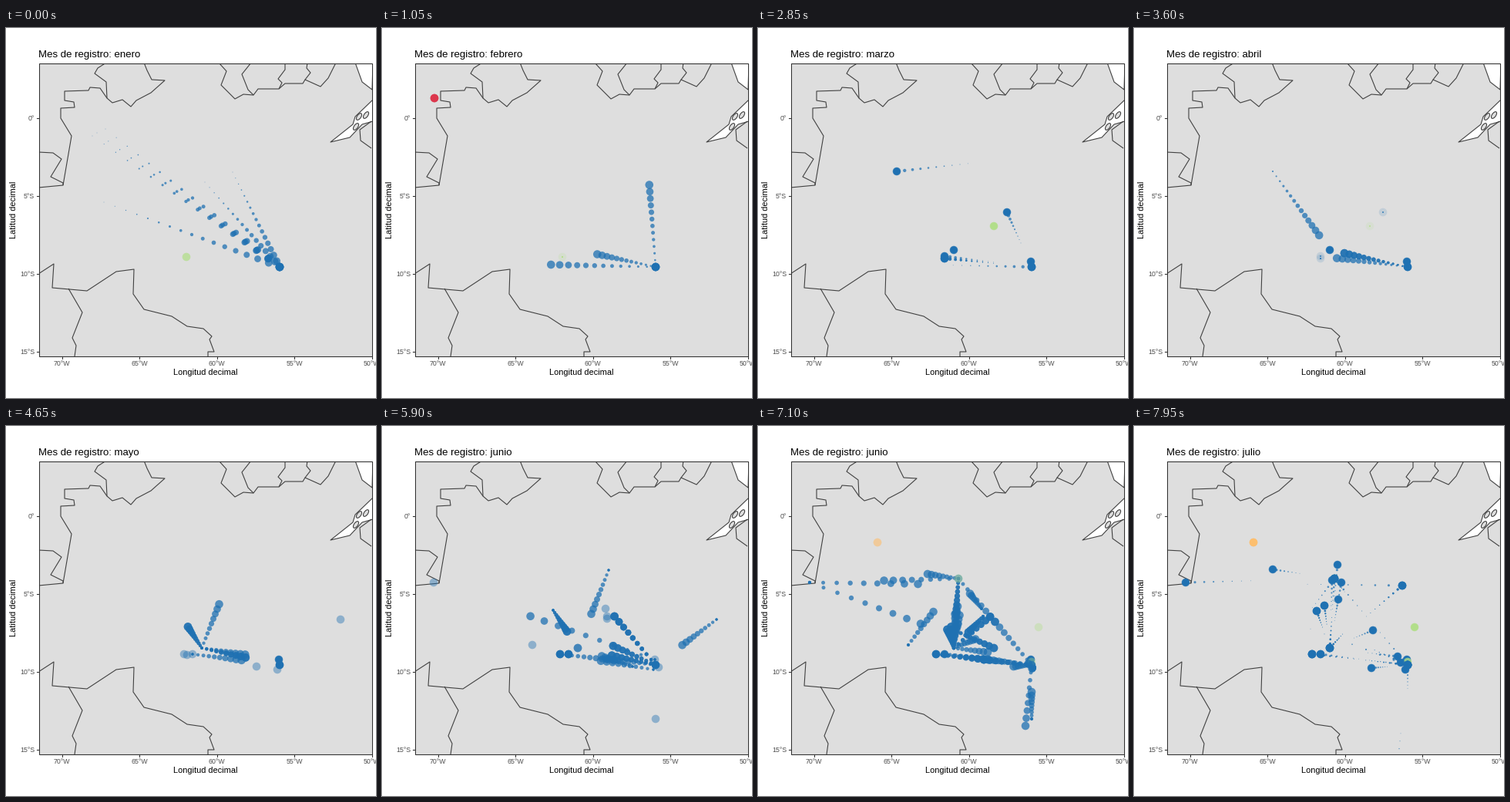
Animation, 480 px wide and 480 px high, one loop 8000 ms. Source, as a matplotlib script:

```python
import numpy as np
import matplotlib.pyplot as plt
from matplotlib.animation import FuncAnimation
from matplotlib.colors import to_rgb
from matplotlib.patches import Ellipse, Polygon, Rectangle

SIZE, DPI = 480, 80
PT = 72 / DPI                      # points per pixel
FRAMES, STEP = 160, 50
CYCLE, MOVE, WAKE, LEAD = 25, 16, 17, 16
RADIUS, ALPHA = 5.3, 0.75
LEFT, RIGHT, TOP, BOTTOM = 42.5, 474.5, 45.5, 425.5
LAND, LINE, DARK = "#dedede", "#404040", "#333333"
BLUE, GREEN, RED, ORANGE = "#1f71b2", "#b2df8a", "#dc2840", "#fdbf6f"
MONTHS = "enero febrero marzo abril mayo junio julio".split()

plt.rcParams["font.family"] = "Liberation Sans"
fig = plt.figure(figsize=(SIZE / DPI, SIZE / DPI), dpi=DPI, facecolor="white")
ax = fig.add_axes([0, 0, 1, 1])
ax.set_xlim(0, SIZE)
ax.set_ylim(SIZE, 0)
ax.axis("off")


def panel(**kw):
    box = Rectangle((LEFT, TOP), RIGHT - LEFT, BOTTOM - TOP, **kw)
    return ax.add_patch(box)


def label(x, y, text, px, color="black", **kw):
    return ax.text(x, y, text, fontsize=px * PT, color=color, **kw)


# ---- map -------------------------------------------------------------
clip = panel(fc=LAND, ec="none", zorder=0)
PEN = dict(ec=LINE, lw=1.1 * PT, zorder=1)


def outline(*flat, closed=False, fill="none"):
    xy = np.reshape(flat, (-1, 2))
    patch = Polygon(xy, closed=closed, fc=fill, joinstyle="round", **PEN)
    ax.add_patch(patch).set_clip_path(clip)


def water(*flat):
    outline(*flat, closed=True, fill="white")


water(453, 45, 462, 70, 475, 80, 476, 45)
water(476, 93, 453, 115, 450, 125, 421, 148, 446, 142, 462, 125, 476, 121)
for x, y in (458, 115), (467, 113), (454, 128):
    ax.add_patch(Ellipse((x, y), 5, 10, angle=35, fc=LAND, **PEN))

# north-west
outline(130, 45, 119, 52, 115, 59, 130, 70, 131, 91, 138, 97, 151, 93,
        162, 102, 169, 94, 188, 84, 206, 68, 189, 67, 183, 55, 179, 45)
outline(131, 91, 122, 78, 109, 77, 107, 81, 76, 82, 76, 94, 88, 96, 89, 103,
        71, 104, 71, 117, 85, 140, 74, 204)
outline(42, 161, 61, 162, 72, 170, 58, 193, 74, 201, 74, 204, 42, 207)
# north
outline(276, 45, 286, 56, 279, 74, 297, 92, 308, 86, 321, 87, 327, 79,
        354, 79, 362, 72, 385, 72, 388, 67, 408, 76, 418, 65, 428, 45)
outline(318, 45, 306, 60, 314, 80, 321, 87)
outline(362, 45, 362, 54, 353, 66, 358, 71, 354, 79)
outline(391, 45, 390, 52, 395, 58, 388, 67)
# south-west
outline(42, 319, 62, 306, 60, 337, 105, 341, 143, 316, 166, 313, 165, 345,
        179, 365, 215, 374, 235, 387, 256, 390, 267, 400, 264, 404, 270, 420,
        262, 420, 262, 426)
outline(81, 338, 99, 369, 86, 402, 91, 412, 89, 426)
# river mouth
outline(474, 121, 459, 132, 460, 146, 474, 156)

# ---- frame, ticks and labels -----------------------------------------
panel(fc="none", ec=DARK, lw=1.07 * PT, zorder=5)
for i in range(5):
    x = 72.5 + 100.5 * i
    ax.plot([x, x], [BOTTOM, BOTTOM + 3], color=DARK, lw=1.07 * PT)
    label(x, 438, f"{70 - 5 * i}°W", 8.8, "#4d4d4d", ha="center")
for i in range(4):
    y = 116.5 + 101 * i
    ax.plot([LEFT - 3, LEFT], [y, y], color=DARK, lw=1.07 * PT)
    label(37, y + 3.2, f"{5 * i}°S" if i else "0°", 8.8, "#4d4d4d", ha="right")
label(258.5, 450, "Longitud decimal", 11, ha="center")
label(10, 236, "Latitud decimal", 11, ha="center", va="center", rotation=90)
title = label(42, 38, "", 13.2)

# ---- records: (from, to, copies, colour); None means fade in or out ----
# Places visited more than once
B, H, W, V, N = (355, 310), (254, 288), (242, 296), (231, 296), (260, 198)
E, T, M = (354, 303), (67, 203), (257, 266)
NORTH, WEST, FAR = (344, 168), (174, 306), (180, 186)
UP, LOW, TALL = (323, 239), (242, 299), (294, 187)
MID, EAST, NEAR, SIDE = (222, 239), (434, 251), (325, 312), (352, 316)
LONE, DEEP, R1, R2 = (195, 284), (355, 380), (290, 237), (292, 247)
G1, G2, RUBY = (234, 297), (306, 257), (68, 91)


def go(p, q, n=1, color=BLUE):
    return [(p, q, n, color)]


def stay(*places, n=1):
    return [(p, p, n, BLUE) for p in places]


def enter(*places, n=1, color=BLUE):
    return [(None, p, n, color) for p in places]


def leave(*places, n=1, color=BLUE):
    return [(p, None, n, color) for p in places]


def fan(p, *places, n=1):
    return [(p, q, n, BLUE) for q in places]


def meet(q, *places, n=1):
    return [(p, q, n, BLUE) for p in places]


january = enter(G1, color=GREEN) + meet(
    B, (112, 140), (118, 136), (129, 131), (127, 226), (258, 200), TALL)

february = (leave(G1, color=GREEN) + enter(RUBY, n=3, color=RED)
            + fan(B, NORTH, WEST, H) + stay(B, n=4))

march = (leave(RUBY, n=3, color=RED) + enter(G2, color=GREEN)
         + go(NORTH, FAR) + go(WEST, B) + fan(B, W, UP, E)
         + go(B, LOW, 2) + stay(H, B, B))

april = (leave(G2, color=GREEN) + leave(UP, W, LOW) + go(FAR, H)
         + fan(B, H, H, W) + stay(H, E, B, B))

may = (enter(EAST, NEAR, SIDE, V, (235, 297), W) + fan(H, MID, MID, TALL)
       + meet(B, H, H, W) + go(H, E) + stay(E, B, B))

june = (enter(T, LONE, DEEP, R1, R2, (292, 250), (359, 313), E) + enter(H, n=3)
        + go(EAST, B) + meet(H, TALL, MID, MID) + go(E, T) + go(B, N, 3)
        + fan(B, M, H, n=2) + go(B, W) + go(V, B) + go(NEAR, H) + go(SIDE, V)
        + stay(V, W, B, n=2))

july = (stay(E) + enter((355, 306), (364, 261), color=GREEN)
        + enter((155, 151), n=2, color=ORANGE) + enter(N, n=2, color=GREEN)
        + enter(N) + go(T, (348, 207)) + meet(B, T, DEEP, N)
        + meet(N, LONE, B, H, R1) + fan(N, FAR, T, H, H)
        + fan(B, (339, 468), (308, 314), (346, 307))
        + fan(H, (257, 200), (265, 225), (264, 180), (269, 203), (310, 265),
              (342, 299))
        + fan(H, (237, 240), (247, 233), (348, 207), n=2)
        + go(R2, H, 2) + go(M, B, 2) + go((359, 313), SIDE)
        + go(V, B, 2) + go(B, V, 2) + go(W, B) + go(B, W)
        + stay(V, V, W, B))

STAGES = [january, february, march, april, may, june, july]


def locate(frame):
    """Stage number and step within it."""
    pos = frame + LEAD
    stage = min(pos // CYCLE, len(STAGES) - 1)
    return stage, pos - stage * CYCLE


def dots(frame, age):
    stage, step = locate(frame)
    t = min(step / MOVE, 1)
    radius = 0.35 + (RADIUS - 0.35) * (1 - age / WAKE) ** 1.6
    for p, q, n, color in STAGES[stage]:
        alpha = ALPHA
        if p is None or q is None:
            share = t if p is None else 1 - t
            if share == 0 or (age and share < 1):   # fading leaves no wake
                continue
            alpha *= share
            p = q = p or q
        x = p[0] + (q[0] - p[0]) * t
        y = p[1] + (q[1] - p[1]) * t
        for _ in range(n):
            yield x, y, radius, (*to_rgb(color), alpha)


cloud = ax.scatter([], [], linewidths=0, zorder=3)
cloud.set_clip_path(clip)


def draw(frame):
    found = [d for age in range(WAKE - 1, -1, -1) if frame - age + LEAD >= 0
             for d in dots(frame - age, age)]
    cloud.set_offsets([d[:2] for d in found])
    cloud.set_sizes([(2 * d[2] * PT) ** 2 for d in found], DPI)
    cloud.set_facecolors([d[3] for d in found])
    stage, step = locate(frame)
    month = MONTHS[stage if step >= 9 else stage - 1]
    title.set_text(f"Mes de registro: {month}")
    return cloud, title


anim = FuncAnimation(fig, draw, frames=FRAMES, interval=STEP, repeat=True,
                     repeat_delay=0, blit=False)
plt.show()
```
